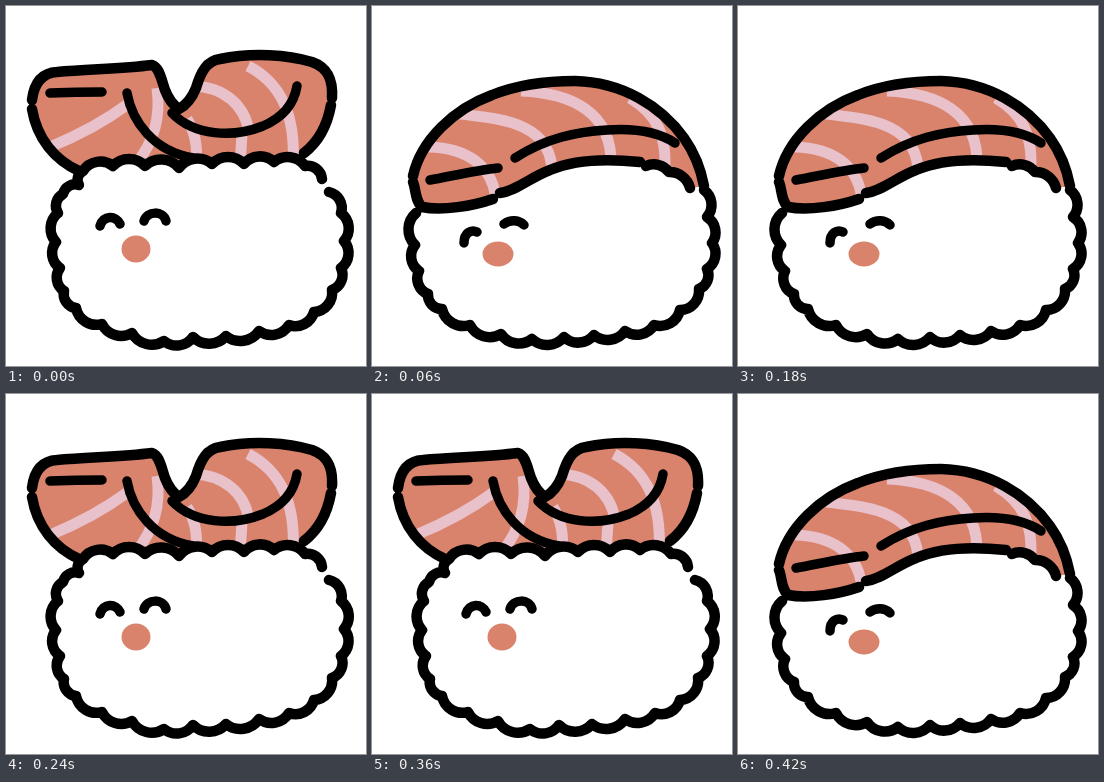
An HTML page for the animation above (980 ms loop, 360x360 px).

```html
<!DOCTYPE html>
<html lang="en">
<head>
<meta charset="utf-8">
<title>Sushi</title>
<style>
  html, body { margin: 0; width: 100%; height: 100%; overflow: hidden; background: #fff; }
  svg { display: block; width: 100vw; height: 100vh; }
  path { fill: none; stroke-linecap: round; stroke-linejoin: round; }
  .fish { fill: #d9826c; }
  .stripe { stroke: #e8c1ca; stroke-width: 11; stroke-linecap: butt; }
  .rice { fill: #fff; }
  .ink { stroke: #000; stroke-width: 10.5; }
  .line { stroke: #000; stroke-width: 9.5; }
</style>
</head>
<body>
<svg id="stage" viewBox="0 0 360 360"></svg>
<script>
const CYCLE = 980, STEP = 60, LAST = 7;

const bumps = (pts, bulge = 0.68) => pts.map(([x, y], i) => {
  if (!i) return `M${x} ${y}`;
  const r = Math.hypot(x - pts[i - 1][0], y - pts[i - 1][1]) * bulge;
  return `A${r} ${r} 0 0 1 ${x} ${y}`;
}).join('');

// Continues an open path so several pieces can form one fill.
const join = (...parts) => parts[0] + parts.slice(1).map(p => p.replace('M', 'L')).join('') + 'Z';

const path = (cls, d) => `<path class="${cls}" d="${d}"/>`;

function sushi(id, p) {
  return `<g id="${id}"><clipPath id="${id}Clip"><path d="${p.fish}"/></clipPath>` +
    path('fish', p.fish) +
    `<g clip-path="url(#${id}Clip)">${path('stripe', p.stripes)}</g>` +
    path('rice', p.rice) + path('ink', p.ink) + path('line', p.lines) +
    `<ellipse cx="${p.cheek[0]}" cy="${p.cheek[1]}" rx="${p.cheek[2]}" ry="${p.cheek[3]}" fill="#d9826c"/></g>`;
}

// Fish flapping open
const flapTop = 'M26 94C28 78 35 67 51 66C82 63 115 63 146 59C153 61 155 72 159 84Q164 97 173 103' +
  'Q184 97 190 82C195 65 201 55 214 53C247 46 282 49 306 56C323 62 327 75 326 92';
const flapLeft = 'M73 165C49 154 31 133 26 103';
const flapRight = 'M325 99C321 121 311 137 298 147';
const openTop = bumps([[52, 207], [57, 188], [73, 179], [77, 165], [107, 160], [139, 160],
  [173, 162], [206, 158], [238, 158], [268, 156], [299, 160], [316, 173]]);
const openSide = bumps([[323, 186], [335, 207], [338, 235], [335, 262], [326, 284], [308, 306],
  [283, 319], [253, 325], [220, 330], [187, 331], [158, 335], [126, 327], [96, 318],
  [70, 302], [58, 285], [54, 262], [50, 236], [52, 207]]);

const open = {
  fish: join(flapTop, flapRight, 'M290 175L80 175', flapLeft),
  stripes: 'M44 141C66 132 95 118 122 98M151 82Q157 125 130 158' +
    'M187 80C218 81 239 99 243 126M242 60C273 76 290 106 287 158' +
    'M181 113Q193 132 190 160M236 128L234 160',
  rice: join(openTop, openSide),
  ink: flapTop + flapLeft + flapRight + openTop + openSide,
  lines: 'M44 87Q70 86 96 86M121 87C126 115 147 145 187 152' +
    'M166 107C188 130 227 132 257 120C278 111 288 98 291 80' +
    'M94 220C97 209 110 209 114 218M138 215C141 205 157 204 160 215',
  cheek: [130, 243, 14.5, 13.5]
};

// Fish lying on the rice
const back = 'M41 170C49 134 82 103 120 89C145 79 173 75 203 75C250 76 289 100 312 132Q327 153 332 180';
const hemLeft = 'M41 176C44 183 43 195 50 201C70 205 101 200 121 193';
const hemMid = 'M128 187C144 185 159 171 178 164C206 152 240 153 268 156';
const hemRight = bumps([[274, 160], [297, 166], [318, 182]], 0.8);
const shutSide = bumps([[332, 184], [335, 211], [340, 237], [335, 263], [327, 283], [308, 304],
  [282, 319], [253, 325], [222, 329], [192, 331], [160, 333], [129, 328], [98, 319],
  [70, 303], [56, 288], [47, 265], [43, 239], [44, 207]]);

const shut = {
  fish: join(back, 'M318 182L297 166L268 156', 'M268 156C240 153 206 152 178 164C159 171 144 185 128 187L121 193C101 200 70 205 50 201C43 195 44 183 41 176'),
  stripes: 'M88 108C128 113 181 116 180 168M149 85C199 87 241 106 239 160' +
    'M57 141C91 142 123 157 124 198M258 92C283 107 297 128 292 172',
  rice: join(shutSide, hemLeft, hemMid, hemRight),
  ink: back + hemLeft + hemMid + hemRight + shutSide,
  lines: 'M58 174C80 170 106 164 126 162M143 152C174 132 204 126 235 124C264 122 288 127 303 137' +
    'M92 237C92 227 99 223 105 226M132 218C139 213 147 214 152 219',
  cheek: [126, 248, 15.5, 12.5]
};

const stage = document.getElementById('stage');
stage.innerHTML = sushi('open', open) + sushi('shut', shut);
const poses = ['open', 'shut'].map(id => document.getElementById(id));

function draw() {
  const step = Math.min(LAST, Math.floor(performance.now() % CYCLE / STEP));
  poses.forEach((g, i) => g.setAttribute('visibility', step % 2 === i ? 'visible' : 'hidden'));
  requestAnimationFrame(draw);
}
draw();
</script>
</body>
</html>
```
